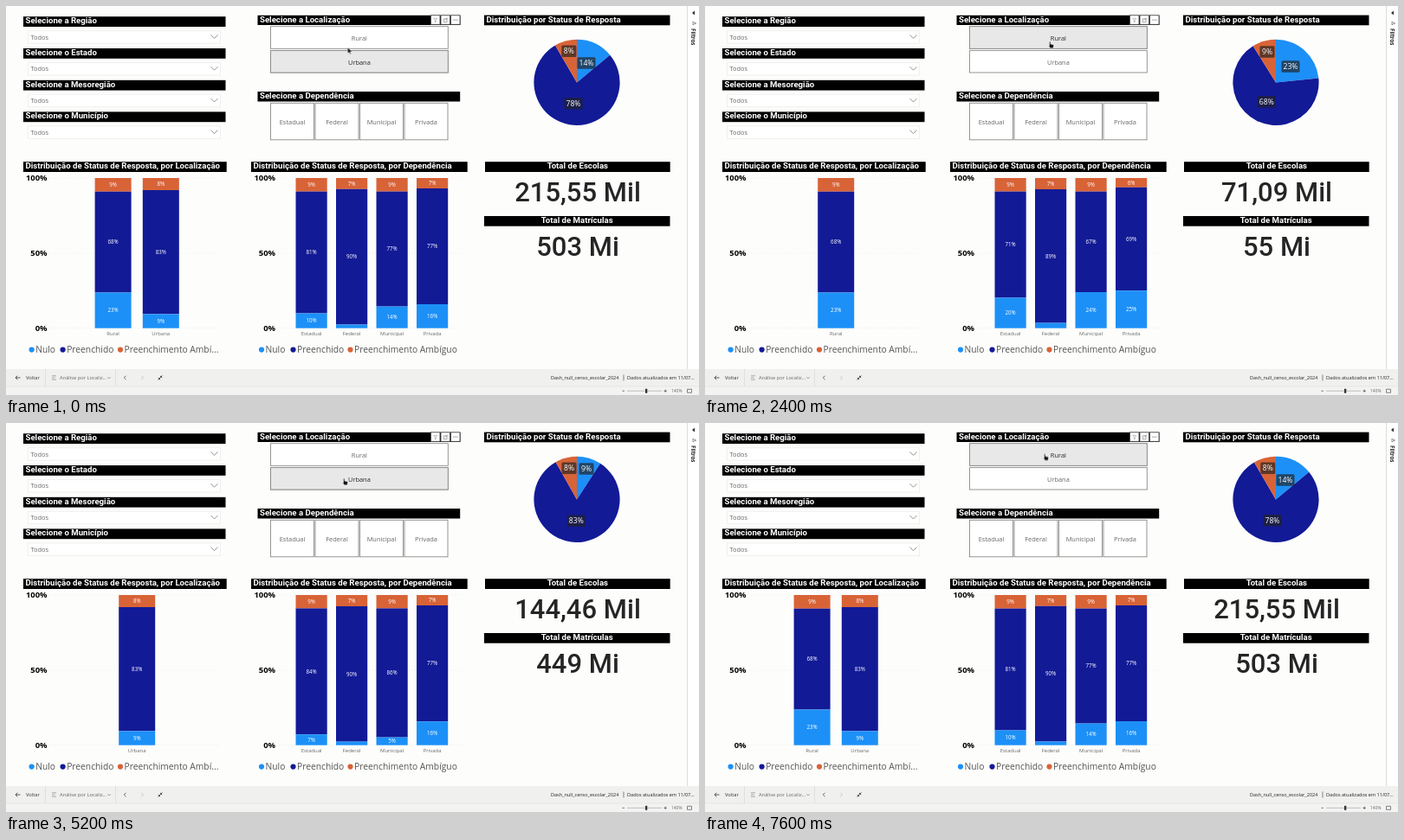
An HTML page that plays this animation: 800x450 px, repeating every 8000 ms.

```html
<!DOCTYPE html>
<html lang="pt">
<head>
<meta charset="utf-8">
<title>Painel</title>
<style>
html, body { margin: 0; width: 100%; height: 100%; overflow: hidden; background: #fdfdfc; }
svg { display: block; width: 800px; height: 450px; }
text { font-family: "Open Sans", "Noto Sans", sans-serif; white-space: pre; }
.din { font-family: Roboto, Inter, sans-serif; }
.step { animation: 8s step-end infinite; }
#all { animation-name: all; }
#rural { animation-name: rural; }
#urbana { animation-name: urbana; }
#hotRural { animation-name: hotRural; }
#hotUrbana { animation-name: hotUrbana; }
#hotEstadual { animation-name: hotEstadual; }
#arrow { animation-name: arrow; }
#hand { animation-name: hand; }
@keyframes all { 0%, 47.5%, 85% { opacity: 1 } 15%, 65% { opacity: 0 } }
@keyframes rural { 0%, 47.5% { opacity: 0 } 15% { opacity: 1 } }
@keyframes urbana { 0%, 85% { opacity: 0 } 65% { opacity: 1 } }
@keyframes hotRural { 0%, 50% { opacity: 0 } 2.5%, 95% { opacity: 1 } }
@keyframes hotUrbana { 0%, 50% { opacity: 1 } 2.5%, 87.5% { opacity: 0 } }
@keyframes hotEstadual { 0%, 95% { opacity: 0 } 87.5% { opacity: 1 } }
@keyframes arrow {
  0% { opacity: 1; transform: translate(394.5px, 48px) }
  2.5%, 95% { opacity: 0 }
  92.5% { opacity: 1; transform: translate(372px, 91px) }
}
@keyframes hand {
  0%, 92.5% { opacity: 0 }
  2.5% { opacity: 1; transform: translate(397px, 41px) }
  50% { opacity: 1; transform: translate(389px, 63.5px) }
  62.5% { opacity: 1; transform: translate(389px, 64px) }
  87.5% { opacity: 1; transform: translate(338px, 144px) }
  90% { opacity: 1; transform: translate(339px, 145px) }
  95%, 100% { opacity: 1; transform: translate(391px, 35.5px) }
}
</style>
</head>
<body>
<svg id="stage" viewBox="0 0 800 450"></svg>
<script>
const BLUE = '#1c90f7', NAVY = '#121a96', ORANGE = '#d86337';
const GRAY = '#666', DARK = '#252525';

const rect = (x, y, w, h, fill, extra = '') =>
  `<rect x="${x}" y="${y}" width="${w}" height="${h}" fill="${fill}" ${extra}/>`;
const line = (d, color, width = 1, extra = '') =>
  `<path d="${d}" fill="none" stroke="${color}" stroke-width="${width}" ${extra}/>`;
const dot = (x, y, r, fill) => `<circle cx="${x}" cy="${y}" r="${r}" fill="${fill}"/>`;
// y is the middle of the capital letters
const text = (s, x, y, size, fill = GRAY, anchor = 'start', extra = '') =>
  `<text x="${x}" y="${y + size * 0.357}" font-size="${size}" fill="${fill}" text-anchor="${anchor}" ${extra}>${s}</text>`;
const mid = (s, x, y, size, fill, extra) => text(s, x, y, size, fill, 'middle', extra);
const group = (id, body) => `<g id="${id}" class="step">${body}</g>`;

function title(s, x, y, w, h, textY, centered) {
  return rect(x, y, w, h, '#000') +
    text(s, centered ? x + w / 2 : x + 2.5, textY, 9.65, '#fff', centered ? 'middle' : 'start',
      'class="din" font-weight="700"');
}

function dropdown(label, y) {
  return title(label, 20, y, 233.5, 11.8, y + 4.5) +
    rect(25.5, y + 16.5, 222, 14.5, '#fff', 'stroke="#efefef"') +
    text('Todos', 28.5, y + 23.8, 7.4) +
    line(`M236.5 ${y + 21.2}l4 4l4-4`, '#777', 0.8);
}

function button(label, x, y, w, h, hot) {
  return rect(x, y, w, h, hot ? '#e8e8e8' : '#fff', 'stroke="#8a8a8a" stroke-width=".9"') +
    mid(label, x + w / 2, y + h / 2 + 0.6, 7.45, hot ? DARK : GRAY);
}
const ruralBtn = hot => button('Rural', 305.5, 23.7, 204.8, 25.6, hot);
const urbanaBtn = hot => button('Urbana', 305.5, 51.6, 204.8, 25.4, hot);
const depBtn = (label, i, hot) => button(label, 305.5 + i * 51.5, 112.3, 50, 42.5, hot);
const DEPS = ['Estadual', 'Federal', 'Municipal', 'Privada'];

function headerIcons(y) {
  const boxes = [490.5, 502, 513.5].map(x => rect(x, y, 10.5, 10.5, '#fff', 'stroke="#444" stroke-width=".8"'));
  return boxes.join('') +
    line(`M493.8 ${y + 3.5}h4l-1.5 2v2.5h-1v-2.5z`, '#999', 0.6) +
    line(`M505.5 ${y + 4}h3.5v4h-3.5zM507 ${y + 5.5}l3-2.5`, '#777', 0.6) +
    line(`M516.5 ${y + 5.3}h5`, '#444', 0.9, 'stroke-dasharray="1 1"');
}

function axes(x, from, to) {
  return [['100%', 199], ['50%', 286], ['0%', 372.5]].map(([s, y]) =>
    text(s, x, y - 0.3, 9.4, '#000', 'end', 'font-weight="700"') +
    line(`M${from} ${y}H${to}`, '#e6e6e6', 0.6, 'stroke-dasharray="1 2"')).join('');
}

function legend(xs, last) {
  const items = [['Nulo', BLUE], ['Preenchido', NAVY], [last, ORANGE]];
  return items.map(([s, c], i) =>
    dot(xs[i], 397.6, 3.1, c) + text(s, xs[i] + 4.6, 397.8, 10.25, '#555')).join('');
}

// low: top of the blue part, high: bottom of the orange part
function bar(name, x, w, low, high, labels) {
  const cx = x + w / 2, top = 199, base = 372.7;
  const mids = [(low + base) / 2, (low + high) / 2, (top + high) / 2];
  return rect(x, top, w, high - top, ORANGE) + rect(x, high, w, low - high, NAVY) +
    rect(x, low, w, base - low, BLUE) +
    labels.map((v, i) => v ? mid(v + '%', cx, mids[i], 6.2, '#fff') : '').join('') +
    mid(name, cx, 378.5, 6);
}

function pie(shares, spots) {
  const cx = 659, cy = 88.4, r = 49.6, colors = [BLUE, NAVY, ORANGE];
  const at = p => {
    const a = 2 * Math.PI * p;
    return `${cx + r * Math.sin(a)} ${cy - r * Math.cos(a)}`;
  };
  let sum = 0;
  const slices = shares.map((v, i) => {
    const start = sum;
    sum += v / 100;
    return `<path d="M${cx} ${cy}L${at(start)}A${r} ${r} 0 ${v > 50 ? 1 : 0} 1 ${at(sum)}Z" fill="${colors[i]}"/>`;
  });
  const tags = shares.map((v, i) => {
    const [x, y] = spots[i], s = Math.round(v) + '%', w = s.length > 2 ? 21 : 17;
    return rect(x - w / 2, y - 6.7, w, 13.4, '#222', 'opacity=".68" rx="1.5"') + mid(s, x, y, 8.6, '#fff');
  });
  return slices.join('') + tags.join('');
}

function view(id, v) {
  const deps = v.deps.map((d, i) => bar(DEPS[i], 334.5 + i * 46.5, 36.2, ...d));
  const big = (s, y) => mid(s, 660, y, 31, DARK, 'class="din" font-weight="500"');
  return group(id, v.places.map(p => bar(...p)).join('') + deps.join('') +
    pie(v.pie, v.spots) + big(v.schools, 215.2) + big(v.pupils, 277.6));
}

const ruralBar = x => ['Rural', x, 42, 331.5, 214.7, [23, 68, 9]];
const urbanaBar = x => ['Urbana', x, 42, 356.4, 213, [9, 83, 8]];

const views = {
  all: {
    places: [ruralBar(102.6), urbanaBar(157.8)],
    deps: [[355.5, 214.6, [10, 81, 9]], [368.5, 211.8, [0, 90, 7]],
           [347.6, 214.6, [14, 77, 9]], [345, 211, [16, 77, 7]]],
    pie: [14, 77.6, 8.4], spots: [[670, 66], [655, 112.8], [649.8, 52.3]],
    schools: '215,55 Mil', pupils: '503 Mi'
  },
  rural: {
    places: [ruralBar(130.2)],
    deps: [[337.5, 214.6, [20, 71, 9]], [366.6, 212, [0, 89, 7]],
           [331, 214.6, [24, 67, 9]], [329.2, 209.8, [25, 69, 6]]],
    pie: [23.4, 67.7, 8.9], spots: [[676, 70], [648.3, 110.8], [649, 53]],
    schools: '71,09 Mil', pupils: '55 Mi'
  },
  urbana: {
    places: [urbanaBar(130.2)],
    deps: [[360.2, 214.4, [7, 84, 9]], [368.6, 212, [0, 90, 7]],
           [363.6, 214.4, [5, 86, 9]], [345.2, 211, [16, 77, 7]]],
    pie: [9.2, 82.6, 8.2], spots: [[670, 53], [658.3, 113.2], [650, 52.3]],
    schools: '144,46 Mil', pupils: '449 Mi'
  }
};

const slicers =
  dropdown('Selecione a Região', 12.2) + dropdown('Selecione o Estado', 49) +
  dropdown('Selecione a Mesoregião', 85.8) + dropdown('Selecione o Município', 122.4) +
  title('Selecione a Localização', 290.5, 10.8, 234, 11.2, 15.4) + headerIcons(10.8) +
  title('Selecione a Dependência', 290.5, 99, 233.7, 11.5, 103.4) +
  ruralBtn() + urbanaBtn() + DEPS.map((d, i) => depBtn(d, i)).join('') +
  group('hotRural', ruralBtn(true)) + group('hotUrbana', urbanaBtn(true)) +
  group('hotEstadual', depBtn(DEPS[0], 0, true) + headerIcons(99));

const frames =
  title('Distribuição por Status de Resposta', 552, 10.6, 214.5, 11.7, 15.3) +
  title('Distribuição de Status de Resposta, por Localização', 20, 180.2, 234.7, 11.8, 184.6) +
  title('Distribuição de Status de Resposta, por Dependência', 283, 180.2, 249.7, 11.8, 184.6) +
  title('Total de Escolas', 553, 180.2, 213.7, 11.8, 184.6, true) +
  title('Total de Matrículas', 552, 243, 214.5, 11.7, 247.2, true) +
  axes(47.5, 50, 248) + axes(311, 315, 527) +
  legend([29.6, 65.6, 132], 'Preenchimento Ambí...') +
  legend([295, 331.5, 397.5], 'Preenchimento Ambíguo');

const sidebar =
  rect(786.5, 0, 14, 420, '#fff') + line('M786.5 0V420', '#dcdcdc') +
  '<path d="M795 5.5v5l-3-2.5z" fill="#333"/>' +
  line('M793 18v4l1.7-1.3h1.5v-1.4h-1.5z', '#666', 0.7) +
  `<g transform="translate(793.3 26) rotate(90)">${text('Filtros', 0, 0, 6.2, '#222', 'start', 'font-weight="700"')}</g>`;

const footer =
  rect(0, 420, 800, 30, '#f0f0ef') + rect(0, 440, 800, 10, '#f3f3f2') + line('M0 440H800', '#e3e3e3', 0.8) +
  line('M16.5 430h-5.5m2.3-2.3l-2.3 2.3l2.3 2.3', '#333', 0.8) + text('Voltar', 23, 430.3, 5.75, '#333') +
  line('M45.5 420V440M126.5 420V440', '#dcdcdc', 0.8) +
  line('M53 427.8h5M53 430h3.5M53 432.2h5', '#888', 0.7) +
  text('Análise por Localiz...', 62, 430.3, 5.75) +
  line('M117.3 429.3l1.7 1.7l1.7-1.7', '#777', 0.7) +
  line('M138.5 427.8l-2.2 2.2l2.2 2.2', '#444', 0.8) + line('M156.3 427.8l2.2 2.2l-2.2 2.2', '#bbb', 0.8) +
  line('M180.5 427.5l-2 2m0-1.7v1.7h1.7M175.5 432.5l2-2m-1.7 0h1.7v1.7', '#333', 0.8) +
  text('Dash_null_censo_escolar_2024', 629, 430, 5.5, '#222') + line('M713 426.5V433.5', '#555', 0.7) +
  text('Dados atualizados em 11/07...', 717, 430, 5.55, '#222') +
  line('M711.5 445.3h2.5M759.5 445.3h3.4M761.2 443.6v3.4', '#444', 0.7) +
  line('M717 445.3H757', '#aaa', 0.7) + rect(738, 442.8, 2.3, 5, '#333') +
  text('140%', 768, 445.3, 4.9) + line('M786.5 443.3h5v4h-5z', '#666', 0.8);

const cursors =
  group('arrow', '<path d="M0 0v6.8l1.6-1.4l1.1 2.3l1.1-.5l-1.1-2.2h2.2z" fill="#111" stroke="#fff" stroke-width=".4"/>') +
  group('hand', '<path d="M.6.6q.8-.7 1.3.2v2.2l3 .8q.7.3.6 1.2l-.7 2.8h-3L-.4 5.3q.1-.9 1 .1z" fill="#111" stroke="#fff" stroke-width=".4"/>');

document.getElementById('stage').innerHTML =
  rect(0, 0, 800, 450, '#fdfdfc') + frames + slicers +
  Object.entries(views).map(([id, v]) => view(id, v)).join('') +
  sidebar + footer + cursors;
</script>
</body>
</html>
```
